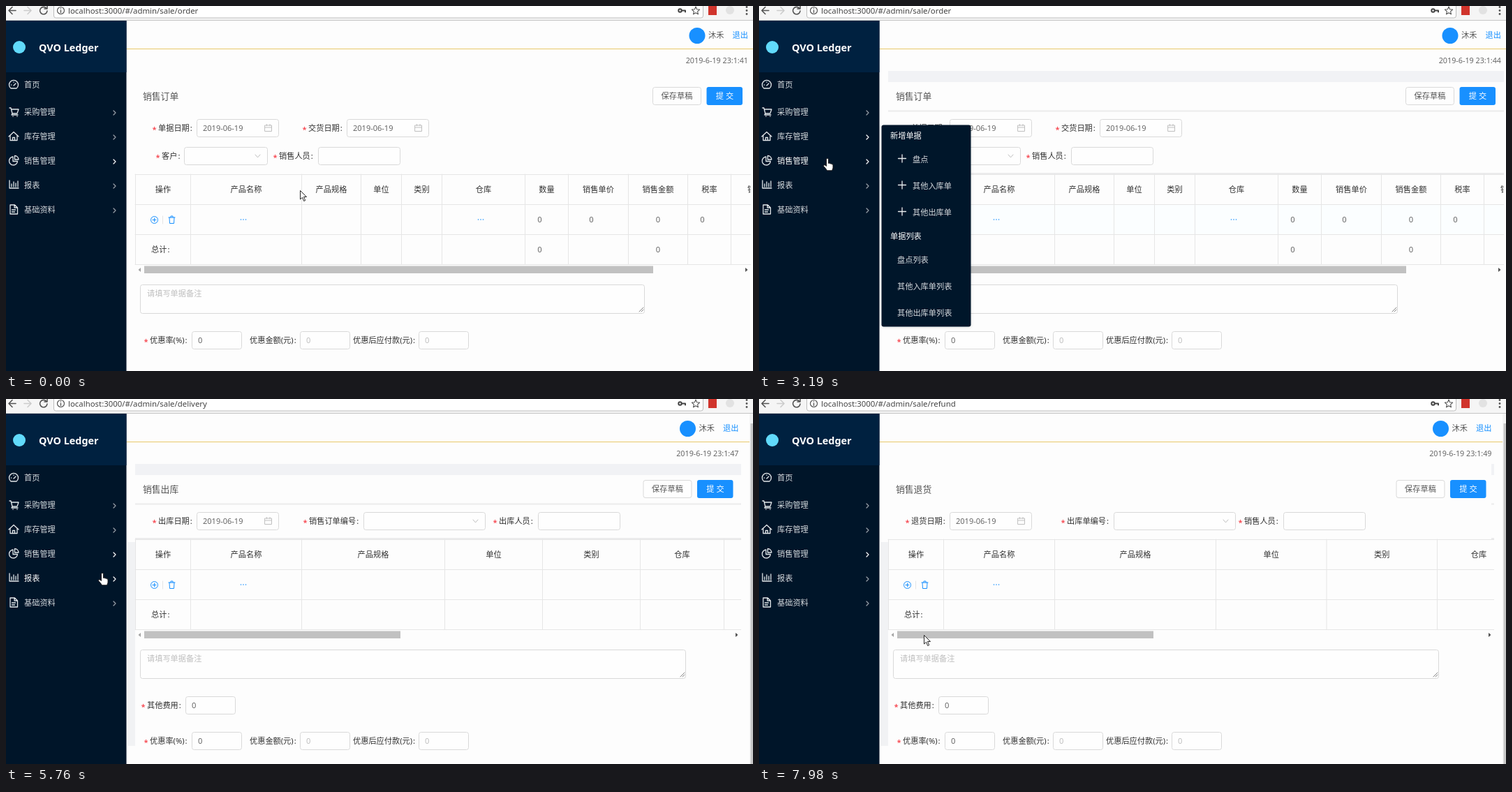
These frames come from a looping animation (1070x523 px, 8 s). An HTML page:

```html
<!DOCTYPE html>
<html lang="zh-CN">
<head>
<meta charset="utf-8">
<title>Order admin</title>
<style>
html,body{margin:0;width:100%;height:100%;overflow:hidden;background:#fdfdfd}
svg{display:block;width:100%;height:100%}
text{font-family:"Noto Sans","Noto Sans CJK SC","Noto Sans CJK",sans-serif;white-space:pre}
.line{fill:none;stroke-linecap:round;stroke-linejoin:round}
</style>
</head>
<body>
<svg id="stage" viewBox="0 0 1070 523"></svg>
<script>
const BLUE = '#1890ff', NAVY = '#001529', INK = '#303030', SOFT = '#666', PALE = '#bfbfbf', RULE = '#e6e6e6';
const MENU_TEXT = '#d6dade', LOOP = 8000;

// Drawing helpers; y is the vertical centre of a text
const text = (x, y, s, fill = INK, size = 11.2, extra = '') =>
  `<text x="${x}" y="${y + size * .37}" fill="${fill}" font-size="${size}" ${extra}>${s}</text>`;
const mid = (x, y, s, fill, size) => text(x, y, s, fill, size, 'text-anchor="middle"');
const rect = (x, y, w, h, fill, extra = '') =>
  `<rect x="${x}" y="${y}" width="${w}" height="${h}" fill="${fill}" ${extra}/>`;
const line = (d, stroke, width = 1, extra = '') =>
  `<path class="line" d="${d}" stroke="${stroke}" stroke-width="${width}" ${extra}/>`;
const disc = (x, y, r, fill) => `<circle cx="${x}" cy="${y}" r="${r}" fill="${fill}"/>`;
const ring = (x, y, r, stroke, width = 1) =>
  `<circle cx="${x}" cy="${y}" r="${r}" fill="none" stroke="${stroke}" stroke-width="${width}"/>`;
const group = (id, body) => `<g id="${id}">${body}</g>`;

// Form parts
const box = (x, y, w, h = 25) => rect(x + .5, y + .5, w - 1, h, '#fff', 'rx="3" fill-opacity=".6" stroke="#d9d9d9"');
const label = (x, y, s, required = true) =>
  (required ? text(x - 8.5, y + 1.5, '*', '#f5222d') : '') + text(x, y, `${s}<tspan dx="1">:</tspan>`);
const dateField = (x, y) => box(x, y, 118) + text(x + 9, y + 13, '2019-06-19', SOFT, 11) +
  line(`M${x + 98} ${y + 9}h9.5v8.5h-9.5zm0 3h9.5m-7 -4.5v2m4.5 -2v2`, PALE);
const selectField = (x, y, w) => box(x, y, w) + line(`M${x + w - 18} ${y + 11}l3.5 4 3.5 -4`, PALE);
const numberField = (x, y, fill = SOFT) => box(x, y, 72) + text(x + 9, y + 13, '0', fill);
const remark = (y, right) => box(192, y, right - 192, 41) + text(202, y + 13, '请填写单据备注', PALE) +
  line(`M${right - 8} ${y + 39}l6 -6m-3 6l3 -3`, '#777', .9);
const discount = y => label(206, y + 13, '优惠率(%)') + numberField(266, y) +
  label(349, y + 13, '优惠金额(元)', false) + numberField(421, y, PALE) +
  label(497, y + 13, '优惠后应付款(元)', false) + numberField(591, y, PALE);

// A column is {name, w, shift, total}; those with a shift show a number
function table(top, columns, right, thumbEnd) {
  const bottom = top + 129, row = top + 65;
  const dots = x => [-3.5, 0, 3.5].map(d => disc(x + d, row, .8, BLUE)).join('');
  const zero = (x, y) => mid(x, y, '0', SOFT);
  let x = 185.5, rules = '', cells = '';
  for (let i = 0; i < 4; i++) rules += `M185 ${top + i * 43 + .5}H${right}`;
  for (const { name, w, shift, total } of columns) {
    const centre = x + w / 2;
    rules += `M${x} ${top}V${bottom}`;
    cells += mid(centre, top + 22, name);
    if (shift !== undefined) cells += zero(centre + shift, row) + (total ? zero(centre + shift, row + 43) : '');
    if (name === '产品名称' || (name === '仓库' && right === 1067)) cells += dots(centre - 4);
    x += w;
  }
  return `<g clip-path="url(#clip${right})">${line(rules, RULE)}${cells}</g>` +
    ring(212.5, row + .5, 5, BLUE) + line(`M210 ${row + .5}h5m-2.5 -2.5v5`, BLUE) +
    line(`M224.5 ${row - 5}v11`, RULE) +
    line(`M233 ${row - 3}h9m-6 0v-2h3v2m-5 0l.5 8.5h6l.5 -8.5`, BLUE) +
    label(208, row + 43, '总计', false) +
    rect(198, bottom + 2.5, thumbEnd - 198, 10.5, '#c1c1c1') +
    `<path d="M193 ${bottom + 5}v6l-3.5 -3z" fill="#a3a3a3"/>` +
    `<path d="M${right - 8} ${bottom + 5}v6l3.5 -3z" fill="#505050"/>`;
}
const columns = (spec, w, stockWidth) => [
  { name: '操作', w: 79 }, { name: '产品名称', w: 159 }, { name: '产品规格', w: spec },
  { name: '单位', w }, { name: '类别', w }, { name: '仓库', w: stockWidth }];

const page = (name, dateName, body) =>
  text(196, 129, name, '#555', 12.8) + label(218, 175, dateName) + dateField(273, 162) + body;
const lookupPage = (name, dateName, [code, codeX, selectX], [person, personX], cols) =>
  page(name, dateName, label(codeX, 175, code) + selectField(selectX, 162, 175) +
    label(personX, 175, person) + box(personX + 56, 162, 118) + table(201, cols, 1053, 565) +
    remark(359, 974) + label(202, 439, '其他费用') + numberField(257, 426) + discount(477));

const pages = [
  page('销售订单', '单据日期', label(433, 175, '交货日期') + dateField(488, 162) +
    label(223, 215, '客户') + selectField(255, 202, 120) + label(391, 215, '销售人员') + box(447, 202, 118) +
    table(241, [...columns(85, 58, 119),
      { name: '数量', w: 62, shift: -10, total: true }, { name: '销售单价', w: 86, shift: -10 },
      { name: '销售金额', w: 85, shift: 0, total: true }, { name: '税率', w: 62, shift: -10 },
      { name: '销售税额', w: 92 }], 1067, 927) +
    remark(399, 915) + discount(466)),
  lookupPage('销售出库', '出库日期', ['销售订单编号', 434, 512], ['出库人员', 706],
    [...columns(205, 140, 120), { name: '', w: 90 }]),
  lookupPage('销售退货', '退货日期', ['出库单编号', 441, 508], ['销售人员', 695], columns(231, 158.5, 119))
];

const toolbar = rect(0, 0, 1070, 20, '#f5f5f5') + rect(68.5, -6, 930, 23, '#fff', 'rx="3" stroke="#bdbdbd"') +
  rect(0, 20, 1070, 1, '#c4c4c4') +
  line('M14 6.5H4m5 -5l-5 5 5 5', '#555', 1.6) + line('M26 6.5h10m-5 -5l5 5 -5 5', '#ccc', 1.6) +
  line('M58 3.5a5.2 5.2 0 1 0 1 3.5M59 0v4h-4', '#555', 1.6) +
  ring(78.5, 6.5, 5, '#555', 1.2) + line('M78.5 6v3.5m0 -6v.2', '#555', 1.3) +
  text(89, 6.5, '', '#444', 11.4, 'id="url"') +
  ring(965.5, 6.5, 2.2, '#444', 2) + line('M968 6.5h5v2', '#444', 2) +
  line('M988 1l1.6 3.7 4 .4 -3 2.7 .9 4 -3.5 -2.1 -3.5 2.1 .9 -4 -3 -2.7 4 -.4z', '#555', 1.1) +
  rect(1006, 0, 12, 13, '#d0342c') + disc(1037, 6, 6, '#e2e2e2') +
  [1.5, 6.5, 11.5].map(y => disc(1061, y, 1.4, '#555')).join('');

// Icon paths are relative to the centre of a menu row
const menu = [
  ['首页', 'M7 5a6.5 6.5 0 1 1 8 0zM11 1l3 -3m-6.5 2h.2m3.3 -4v.2'],
  ['采购管理', 'M5 -6h2l2 8h7l2 -6H8m1 6l-1 2h9m-7 2v.3m6 -.3v.3'],
  ['库存管理', 'M4 0l7 -6.5 7 6.5m-12 -1.5v7h10v-7m-6.5 7v-4h3v4'],
  ['销售管理', 'M10 -6a6 6 0 1 0 6.5 6.5H10zM12.5 -7.5v5.5H18a5.5 5.5 0 0 0 -5.5 -5.5'],
  ['报表', 'M5 -7v11h13m-10 -2v-4m3 4v-7m3 7v-5m3 5v-8'],
  ['基础资料', 'M6 -7h6.5l4 4v9H6zm6 0v4h4m-7.5 3h5m-5 3h4']];
const menuY = i => i ? 117 + 35 * i : 113;
const sidebar = rect(0, 21, 172.5, 502, NAVY) + rect(0, 21, 172.5, 74, '#002140') + disc(19, 59, 9, '#61dafb') +
  text(47, 60, 'QVO Ledger', '#fff', 14.4, 'font-weight="600"') +
  menu.map(([name, icon], i) => `<g transform="translate(0 ${menuY(i)})">` +
    line(icon, '#e4e7ea', 1.3) + text(26, 0, name, MENU_TEXT, 11.2, `id="item${i}"`) +
    line(i ? 'M154 -2l3 3 -3 3' : '', '', 1.2, `id="chevron${i}"`) + '</g>').join('');

const userBar = disc(990, 42.5, 11.5, BLUE) + text(1006, 42, '沐禾', '#555') + text(1040.5, 42, '退出', BLUE) +
  text(1063, 78, '', SOFT, 10.75, 'id="clock" text-anchor="end"') +
  box(926, 116, 70) + mid(961, 129, '保存草稿', '#555') +
  rect(1003.5, 116, 51.5, 26, BLUE, 'rx="3"') + mid(1029.5, 129, '提 交', '#fff');

const rowY = i => 34 + 38 * i + (i > 2 ? 30 : 0);
function popup(id, y, kinds, lists) {
  const heading = (dy, s) => text(188, y + dy, s, '#fff', 11.2, 'font-weight="500"');
  return group(id, rect(175.5, y - 15.5, 128, 289, NAVY, 'rx="3" filter="url(#shade)"') +
    rect(175.5, 0, 128, 32, BLUE, 'class="picked"') + heading(0, '新增单据') + heading(144, '单据列表') +
    [...kinds, ...lists].map((s, i) => text(i < 3 ? 220 : 198, y + rowY(i), s, MENU_TEXT, 11.2, 'class="entry"') +
      (i < 3 ? line(`M199.5 ${y + rowY(i) - 1.5}h11m-5.5 -5.5v11`, '#e8eaec', 1.3) : '')).join(''));
}

const pointer = (id, d) => group(id, `<path d="${d}" fill="#fff" stroke="#111" stroke-width=".9"/>`);
const stage = document.getElementById('stage');
stage.innerHTML = '<defs>' +
  [1067, 1053].map(w => `<clipPath id="clip${w}"><rect width="${w}" height="523"/></clipPath>`).join('') +
  '<filter id="shade" x="-10%" y="-5%" width="120%" height="110%"><feDropShadow dx="0" dy="1" stdDeviation="2" flood-opacity=".12"/></filter></defs>' +
  rect(0, 0, 1070, 523, '#fdfdfd') + rect(172.5, 61, 897.5, 1, '#e8c96a') +
  rect(185, 285, 882, 42, '#fbfeff', 'id="rowTint"') +
  [0, 1, 2].map(i => rect(0, 0, 0, i ? 2 : 16, i ? '#ebebec' : '#f1f2f5', `id="band${i}"`)).join('') +
  rect(174, 0, 11, 0, '#f1f2f4', 'id="strip"') +
  pages.map((body, i) => group('page' + i, body)).join('') +
  group('userBar', userBar) +
  group('scroll', rect(1065, 21, 5, 502, '#f4f4f4') + rect(1066.5, 35, 4, 488, '#c6c6c6')) +
  toolbar + sidebar +
  popup('stock', 186, ['盘点', '其他入库单', '其他出库单'], ['盘点列表', '其他入库单列表', '其他出库单列表']) +
  popup('sales', 221, ['销售订单', '销售出库单', '销售退货单'], ['销售订单列表', '销售出库列表', '销售退货列表']) +
  group('cursor', pointer('arrow', 'M.5 .5v12.5l3 -2.7 2.2 5.2 2 -.9 -2.2 -5.1h4z') +
    pointer('hand', 'M-1.5 1.5q1.5 -2.5 3 0v6q1.5 -1 2.3 .5 1.5 -.8 2.2 .7 2 -.5 2 1.3v4q-.5 2 -1.5 3.8H-.5Q-2 15 -5.5 11.5q-.5 -2.5 2 -1.5l2 1.5z'));

// State changes: [time, value]
const track = {
  page: [[0, 0], [4980, 1], [7830, 2]],
  url: [[0, 'order'], [4560, 'delivery'], [7390, 'refund']],
  popup: [[0, ''], [2760, 'stock'], [3480, 'sales'], [5490, ''], [6310, 'sales'], [7980, '']],
  picked: [[0, 0], [4830, 1], [7390, 2]],
  hand: [[0, 0], [510, 1], [970, 0], [2610, 1], [6730, 0]],
  bandLeft: [[0, 1070], [1375, 185], [3740, 210], [4980, 185], [6040, 1049]],
  stripTop: [[0, 497], [3740, 170], [5490, 205]]
};
const at = (name, t) => track[name].findLast(([start]) => start <= t)[1];

// Cursor moves: eased curves, sampled in as many steps as the picture changes
const moves = [
  { from: 150, to: 510, steps: 4, via: [300, 285], end: [213, 306] },
  { from: 970, to: 1510, steps: 5, via: [300, 290], end: [400, 283] },
  { from: 2190, to: 3190, steps: 8, via: [100, 150], end: [98, 218] },
  { from: 3340, to: 4290, steps: 8, via: [200, 215], end: [220, 293] },
  { from: 4830, to: 5760, steps: 8, via: [190, 265], end: [138, 249] },
  { from: 5910, to: 6450, steps: 5, via: [115, 225], end: [104, 220] },
  { from: 6730, to: 7020, steps: 3, via: [190, 240], end: [229, 326] },
  { from: 7250, to: 7520, steps: 3, via: [233, 332], end: [236, 338] }
];
function cursorAt(t) {
  let point = [421, 264];
  for (const { from, to, steps, via, end } of moves) {
    if (t < from) break;
    const step = Math.floor((t - from) / (to - from) * (steps - 1) + 1e-6) + 1;
    const p = Math.min(1, step / steps), s = p * p * (3 - 2 * p);
    point = point.map((a, i) => (1 - s) ** 2 * a + 2 * s * (1 - s) * via[i] + s * s * end[i]);
  }
  return point.map(Math.round);
}

const el = id => document.getElementById(id);
const show = (node, on) => node.setAttribute('display', on ? 'inline' : 'none');
const set = (node, attrs) => { for (const k in attrs) node.setAttribute(k, attrs[k]); };

function draw(t) {
  const current = at('page', t), open = at('popup', t), hand = at('hand', t);
  const [x, y] = cursorAt(t), right = current ? 1053 : 1067;

  pages.forEach((_, i) => show(el('page' + i), i === current));
  show(el('scroll'), current);
  show(el('rowTint'), t >= 1375 && !current);
  set(el('userBar'), { transform: `translate(${current ? -13.5 : 0} 0)` });
  el('url').textContent = 'localhost:3000/#/admin/sale/' + at('url', t);
  el('clock').textContent = '2019-6-19 23:1:' + (41 + Math.floor((t + 460) / 950));

  const left = at('bandLeft', t), top = at('stripTop', t);
  [93, 149.5, current ? 199 : 239].forEach((bandTop, i) =>
    set(el('band' + i), { x: left, y: bandTop, width: Math.max(0, right - left) }));
  set(el('strip'), { y: top, height: 497 - top });

  menu.forEach((_, i) => {
    const hot = x < 173 && Math.abs(y - menuY(i)) < 17.5;
    const lit = hot || i === 3 || (i === 2 && open === 'stock');
    set(el('item' + i), { fill: hot ? '#fff' : MENU_TEXT });
    set(el('chevron' + i), { stroke: lit ? '#fff' : '#9aa2aa' });
  });

  for (const [id, base] of [['stock', 186], ['sales', 221]]) {
    const node = el(id), mark = node.querySelector('.picked');
    const picked = id === 'sales' ? at('picked', t) : -1;
    show(node, id === open);
    show(mark, picked >= 0);
    set(mark, { y: base + rowY(picked) - 16.5 });
    node.querySelectorAll('.entry').forEach((entry, i) => {
      const over = x > 176 && Math.abs(y - base - rowY(i)) < 16;
      set(entry, { fill: over || i === picked ? '#fff' : MENU_TEXT });
    });
  }

  set(el('cursor'), { transform: `translate(${x} ${y})` });
  show(el('arrow'), !hand);
  show(el('hand'), hand);
}

const begin = performance.now();
function tick() {
  draw((performance.now() - begin) % LOOP);
  requestAnimationFrame(tick);
}
tick();
</script>
</body>
</html>
```
